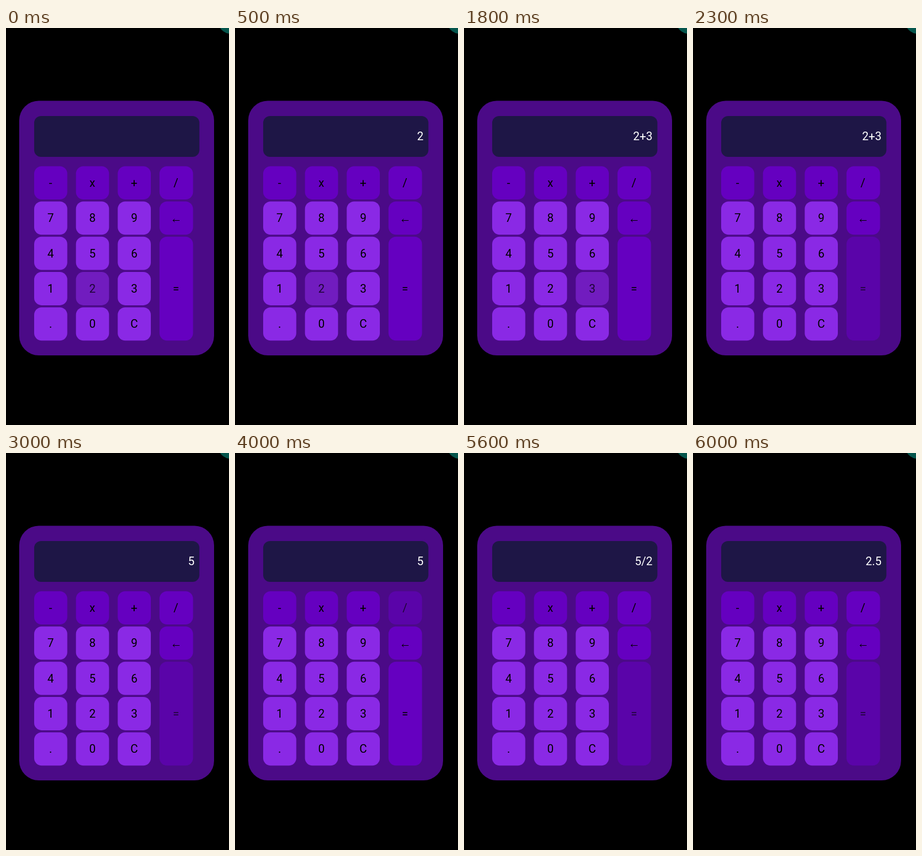
An HTML page that plays this animation: 388x690 px, repeating every 8000 ms.

```html
<!DOCTYPE html>
<html lang="en">
<head>
<meta charset="utf-8">
<title>Calculator</title>
<style>
html, body { margin: 0; width: 100%; height: 100%; overflow: hidden; background: #000; }
svg { display: block; width: 100%; height: 100%; }
text { font: 20px Roboto, Arial, sans-serif; text-anchor: middle; }
.num rect { fill: #8a29e5; }
.op rect { fill: #6500c0; }
#screen text { fill: #fff; text-anchor: end; opacity: 0; }
#screen text, .key { animation: 8s step-end infinite; }

/* highlighted key */
.two { animation-name: two; }
.plus { animation-name: plus; }
.three { animation-name: three; }
.equals { animation-name: equals; }
.slash { animation-name: slash; }
@keyframes two { 0%, 61.25% { opacity: .6 } 11.25%, 70%, 100% { opacity: 1 } }
@keyframes plus { 0%, 17.5%, 100% { opacity: 1 } 11.25% { opacity: .6 } }
@keyframes three { 0%, 28.75%, 100% { opacity: 1 } 17.5% { opacity: .6 } }
@keyframes equals { 0%, 50% { opacity: 1 } 28.75%, 70%, 100% { opacity: .6 } }
@keyframes slash { 0%, 61.25%, 100% { opacity: 1 } 50% { opacity: .6 } }

/* display contents */
#screen text:nth-child(1) { animation-name: t1; }
#screen text:nth-child(2) { animation-name: t2; }
#screen text:nth-child(3) { animation-name: t3; }
#screen text:nth-child(4) { animation-name: t4; }
#screen text:nth-child(5) { animation-name: t5; }
#screen text:nth-child(6) { animation-name: t6; }
#screen text:nth-child(7) { animation-name: t7; }
@keyframes t1 { 0%, 13.75%, 100% { opacity: 0 } 5% { opacity: 1 } }
@keyframes t2 { 0%, 21.25%, 100% { opacity: 0 } 13.75% { opacity: 1 } }
@keyframes t3 { 0%, 31.25%, 100% { opacity: 0 } 21.25% { opacity: 1 } }
@keyframes t4 { 0%, 52.5%, 100% { opacity: 0 } 31.25% { opacity: 1 } }
@keyframes t5 { 0%, 63.75%, 100% { opacity: 0 } 52.5% { opacity: 1 } }
@keyframes t6 { 0%, 72.5%, 100% { opacity: 0 } 63.75% { opacity: 1 } }
@keyframes t7 { 0% { opacity: 0 } 72.5%, 100% { opacity: 1 } }
</style>
</head>
<body>
<svg viewBox="0 0 388 690">
  <rect width="388" height="690"/>
  <circle cx="391" cy="-12" r="22" fill="#05554c"/>
  <rect x="23" y="126.5" width="339" height="442.5" rx="34" fill="#4b0a87"/>
  <rect x="49" y="153" width="287.5" height="71" rx="12" fill="#1e1646"/>
  <g id="screen">
    <text x="328" y="195">2</text>
    <text x="328" y="195">2+</text>
    <text x="328" y="195">2+3</text>
    <text x="328" y="195">5</text>
    <text x="328" y="195">5/</text>
    <text x="328" y="195">5/2</text>
    <text x="328" y="195">2.5</text>
  </g>
  <g id="keys"></g>
</svg>
<script>
const rows = ["-x+/", "789←", "456=", "123", ".0C"];
const names = { 2: "two", 3: "three", "+": "plus", "=": "equals", "/": "slash" };

function key(label, col, row) {
  const x = 49 + col * 72.7, y = 240.2 + row * 61.3;
  const h = label === "=" ? 180.4 : 57.8;
  const kind = row === 0 || col === 3 ? "op" : "num";
  const face = label === "←"
    ? `<path d="M302 334.5H290.5M293.5 332L290.5 334.5L293.5 337" fill="none" stroke="#000"/>`
    : `<text x="${x + 28.6}" y="${y + h / 2 + 7}">${label}</text>`;
  return `<g class="key ${kind} ${names[label] || ""}">
    <rect x="${x}" y="${y}" width="${col === 3 ? 58.3 : 57.6}" height="${h}" rx="13"/>${face}</g>`;
}

document.getElementById("keys").innerHTML =
  rows.map((row, r) => [...row].map((label, c) => key(label, c, r)).join("")).join("");
</script>
</body>
</html>
```
